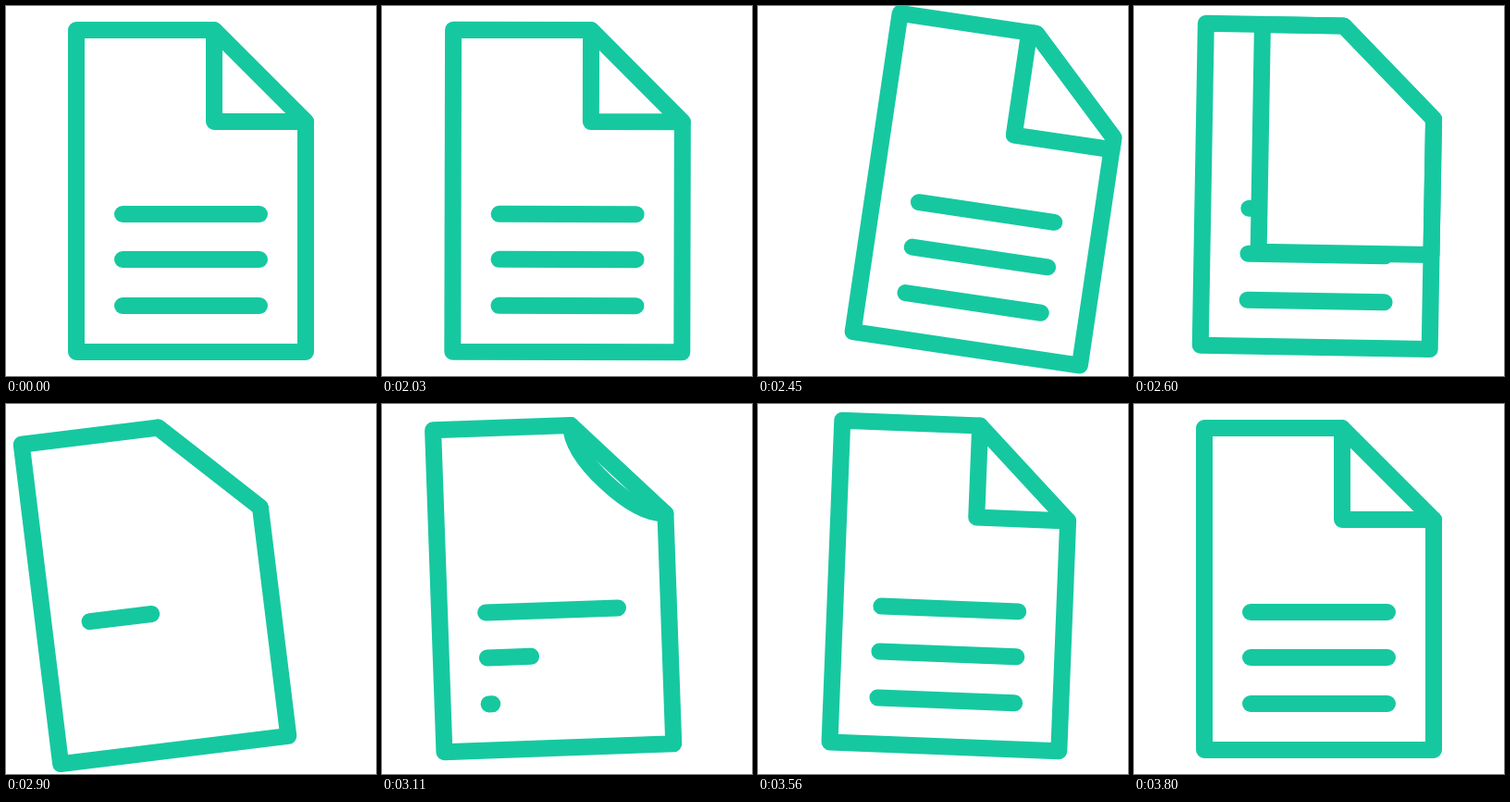
Animation, 400 px wide and 400 px high, one loop 3.83 s. Source, as an HTML page with a canvas:

```html
<!DOCTYPE html>
<html lang="en">
<head>
<meta charset="utf-8">
<title>Page turn</title>
<style>
html, body { margin: 0; width: 100%; height: 100%; overflow: hidden; background: #fff; }
canvas { display: block; width: 400px; height: 400px; }
</style>
</head>
<body>
<canvas width="400" height="400"></canvas>
<script>
const ctx = document.querySelector('canvas').getContext('2d');
const LOOP = 3830, REST = 2000, STEP = 30;
const LINES = [25, 74, 124];
const LINE_STARTS = [22, 30.5, 35.3], LINE_SPAN = 17;
const FLIP = [13.2, 25.4], CURL = [30, 50];

// Keys: time in steps, then values
const SLIDE = [ // x, y, upward arc on the way there
  [0, 0, 0, 0],
  [13.8, 53.4, -1.2, 0],
  [24.9, -39, 1.3, 5.5],
  [30, -39, 1.3, 0],
  [45, 15, -6.4, 0],
  [60, 0, 0, 0]
];
const TILT = [[0, 0], [13.4, 9], [26.6, -7], [30, -7], [45, 4.1], [60, 0]]; // degrees

const lerp = (a, b, p) => a + (b - a) * p;

function ease(n, from, to) {
  const u = Math.min(1, Math.max(0, (n - from) / (to - from)));
  return (1 - Math.cos(Math.PI * u)) / 2;
}

function sample(keys, n) {
  const i = Math.max(1, keys.findIndex(key => key[0] >= n));
  const a = keys[i - 1], b = keys[i];
  const p = ease(n, a[0], b[0]);
  return { p, end: b, values: a.map((v, k) => lerp(v, b[k], p)).slice(1) };
}

function pose(n) {
  const { p, end, values: [x, y] } = sample(SLIDE, n);
  const [angle] = sample(TILT, n).values;
  return { x, y: y - end[3] * 4 * p * (1 - p), angle };
}

function trace(points, closed) {
  ctx.beginPath();
  points.forEach(([x, y]) => ctx.lineTo(x, y));
  if (closed) ctx.closePath();
}

function drawLine(y, p) {
  if (p <= 0) return;
  trace([[-74, y], [lerp(-74, 74, p), y]]);
  ctx.stroke();
}

// The folded corner sweeps over the sheet and wipes its text
function drawFlip(p) {
  const x = lerp(25, -124, p), y = lerp(-75, 174, p);
  trace([[25, -174], [x, -174], [x, y], [124, y], [124, -75]], true);
  ctx.fill();
  ctx.stroke();
}

// A new corner bends inward from the diagonal edge
function drawCurl(p) {
  const h = 49.5 * (1 - p);
  ctx.beginPath();
  ctx.moveTo(25, -174);
  ctx.quadraticCurveTo(25, -75 - 2 * h, 25 + h, -75 - h);
  ctx.quadraticCurveTo(25 + 2 * h, -75, 124, -75);
  ctx.stroke();
}

function draw(n) {
  const { x, y, angle } = pose(n);
  const flip = ease(n, ...FLIP);
  ctx.setTransform(1, 0, 0, 1, 0, 0);
  ctx.fillStyle = '#fff';
  ctx.fillRect(0, 0, 400, 400);
  ctx.translate(200 + x, 200 + y);
  ctx.rotate(angle * Math.PI / 180);
  ctx.strokeStyle = '#16c8a0';
  ctx.lineWidth = 18;
  ctx.lineCap = ctx.lineJoin = 'round';

  if (flip < 1) {
    LINES.forEach(line => drawLine(line, 1));
    drawFlip(flip);
  } else {
    drawCurl(ease(n, ...CURL));
  }
  LINES.forEach((line, i) =>
    drawLine(line, ease(n, LINE_STARTS[i], LINE_STARTS[i] + LINE_SPAN)));
  trace([[-124, -174], [25, -174], [124, -75], [124, 174], [-124, 174]], true);
  ctx.stroke();
}

const start = performance.now();
function tick() {
  const t = (performance.now() - start) % LOOP;
  draw(Math.max(0, Math.floor((t - REST) / STEP)));
  requestAnimationFrame(tick);
}
tick();
</script>
</body>
</html>
```
